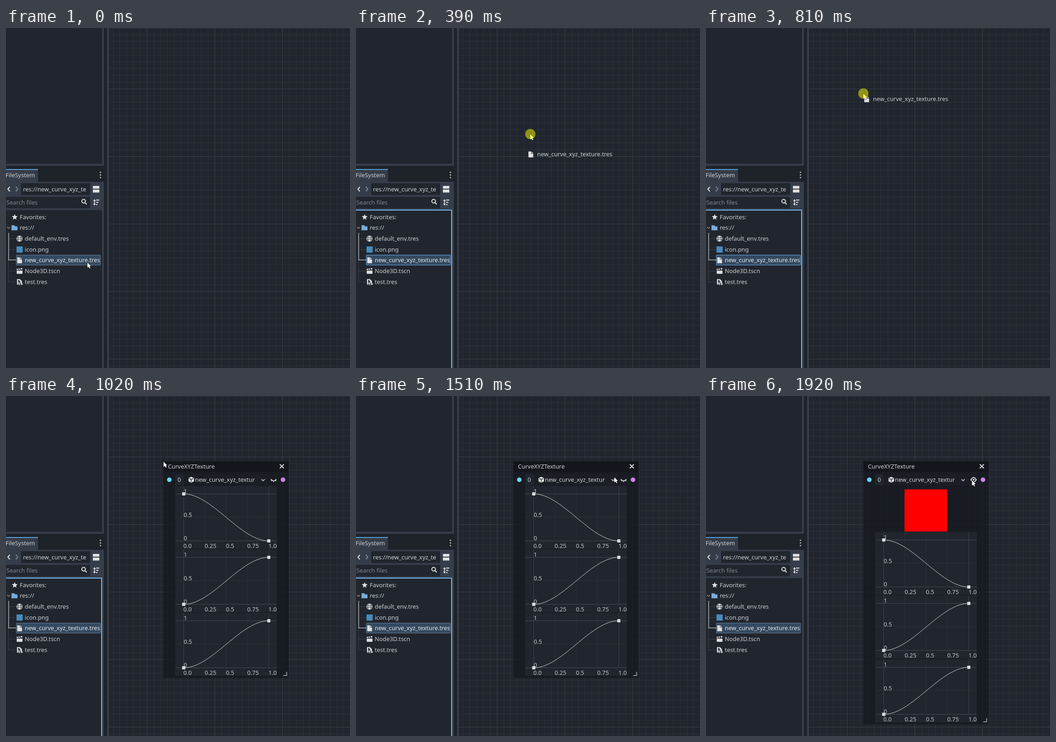
These frames come from a looping animation (752x745 px, 2610 ms). An HTML page with a canvas:

```html
<!DOCTYPE html>
<html lang="en">
<head>
<meta charset="utf-8">
<title>Drag a curve texture into the graph</title>
<style>
html, body { margin: 0; width: 100%; height: 100%; overflow: hidden; background: #21262e; }
canvas { display: block; }
</style>
</head>
<body>
<canvas id="stage" width="752" height="745"></canvas>
<script>
const ctx = document.getElementById("stage").getContext("2d");
const LOOP = 2610;
const PRESS = 250, DRAG = 320, DROP = 950, EYE_PRESS = 1790, PREVIEW = 1920;
const BASE = "#363d4a", PANEL = "#21262e", GAP = "#1e2229";
const TEXT = "#cdcfd2", ICON = "#e0e0e0", BLUE = "#70bafa";
const FILE = "new_curve_xyz_texture.tres";

// Keys are [time, x, y].
const pointerPath = [
  [0, 178, 514], [70, 178, 513.5], [250, 184, 507], [320, 300, 352], [390, 381, 233],
  [460, 383, 172], [530, 381, 147], [600, 374, 140], [670, 357, 139.5], [740, 345.5, 143.5],
  [810, 344, 144], [1020, 344.5, 144], [1090, 352, 146], [1160, 385, 156], [1230, 436, 168],
  [1300, 489, 174], [1370, 530, 175], [1440, 556, 174], [1510, 564.5, 178],
  [1580, 573, 181], [1650, 579, 184], [1720, 582, 186], [1920, 581.5, 185]
];
const dragPath = [
  [320, 250, 470], [390, 382, 277], [460, 394, 215], [530, 394, 168],
  [600, 386, 152.5], [670, 370, 151], [740, 353, 155], [810, 351, 156]
];

function along(path, t) {
  const i = path.findIndex(key => key[0] > t);
  if (i < 0) return path[path.length - 1].slice(1);
  if (i === 0) return path[0].slice(1);
  const [a, b] = [path[i - 1], path[i]];
  const k = (t - a[0]) / (b[0] - a[0]);
  return [a[1] + (b[1] - a[1]) * k, a[2] + (b[2] - a[2]) * k];
}

function tick(t) {
  const from = start => start + 70 * Math.floor((t - start) / 70);
  if (t < 70) return 0;
  if (t < 250) return 70;
  if (t < 810) return from(250);
  if (t < 950) return 810;
  return t < 1920 ? from(950) : 1920;
}

function rect(x, y, w, h, color) {
  ctx.fillStyle = color;
  ctx.fillRect(x, y, w, h);
}

function round(x, y, w, h, r, color) {
  ctx.fillStyle = color;
  ctx.beginPath();
  ctx.roundRect(x, y, w, h, r);
  ctx.fill();
}

function disc(x, y, r, color) {
  ctx.fillStyle = color;
  ctx.beginPath();
  ctx.arc(x, y, r, 0, Math.PI * 2);
  ctx.fill();
}

function text(str, x, y, color = TEXT, size = 12.85) {
  ctx.font = `${size}px "Noto Sans", sans-serif`;
  ctx.fillStyle = color;
  ctx.fillText(str, x, y);
}

// Path data is relative to (x, y).
function shape(d, x, y, { fill, stroke, width = 1.6 }) {
  const path = new Path2D(d);
  ctx.save();
  ctx.translate(x, y);
  if (fill) {
    ctx.fillStyle = fill;
    ctx.fill(path);
  }
  if (stroke) {
    ctx.strokeStyle = stroke;
    ctx.lineWidth = width;
    ctx.stroke(path);
  }
  ctx.restore();
}

function fileIcon(x, y) {
  shape("M-5 -6.5H1V-1.5H5.5V6.5H-5Z M2 -6.5L5.5 -2.5H2Z", x, y, { fill: ICON });
}

function starIcon(x, y) {
  let d = "";
  for (let i = 0; i < 10; i++) {
    const a = i * Math.PI / 5, r = i % 2 ? 3 : 6.8;
    d += `${i ? "L" : "M"}${Math.sin(a) * r} ${-Math.cos(a) * r}`;
  }
  shape(d + "Z", x, y + 0.5, { fill: ICON });
}

function globeIcon(x, y) {
  shape("M-5.8 0A5.8 5.8 0 1 0 5.8 0A5.8 5.8 0 1 0 -5.8 0H5.8M0 -6V6M0 -6Q-5 0 0 6Q5 0 0 -6",
    x, y, { stroke: ICON, width: 1.3 });
}

function sceneIcon(x, y) {
  rect(x - 6, y - 1, 12.5, 7, ICON);
  shape("M-6 -2V-5L-4 -5.3L-2.5 -2.5Z M-2.5 -5.5L0 -5.8L1.5 -3L-1 -2.7Z M2 -6L6 -6.5V-3.5L3.5 -3.2Z",
    x, y, { fill: ICON });
}

function shaderIcon(x, y) {
  shape("M-5.5 6V-6H1L5 -2V1H2V-1H0V-4H-3V6Z", x, y, { fill: ICON });
  shape("M-2 1L-0.5 6L1 1M6 1.5H3V3.5H6V6H2.5", x, y, { stroke: ICON, width: 1.4 });
}

function drawGraph() {
  rect(225, 0, 527, 745, PANEL);
  for (const major of [false, true]) {
    const color = major ? "#3b4047" : "#2c3138";
    for (let i = -9; i < 50; i++) {
      if ((i % 10 === 0) !== major) continue;
      const x = Math.floor(308.2 + i * 14.82), y = Math.floor(133.3 + i * 14.81);
      if (x > 225) rect(x, 0, 1, 745, color);
      rect(225, y, 527, 1, color);
    }
  }
}

function drawDock(focused, selectedFocus) {
  rect(0, 0, 225, 745, GAP);
  rect(0, 0, 214, 302, BASE);
  rect(0, 0, 210, 297.5, PANEL);
  rect(221, 0, 4, 745, BASE);

  rect(0, 309, 70, 28, BASE);
  rect(0, 309, 70, 2, "#5a9ed6");
  text("FileSystem", -1, 326.5);
  for (let i = -1; i <= 1; i++) disc(206.5, 322 + i * 5.7, 1.7, "#a0a3a8");
  rect(0, 337, 214, 408, BASE);

  shape("M2.5 -5L-2 0L2.5 5", 6, 353, { stroke: ICON, width: 2 });
  shape("M-2.5 -5L2 0L-2.5 5", 24, 353, { stroke: "#7d828a", width: 2 });
  round(33, 340, 151, 26, 3, PANEL);
  text("res://new_curve_xyz_te", 37.3, 357.5);
  rect(190, 346, 14, 6, ICON);
  rect(190, 354, 14, 6.5, ICON);

  round(-4, 370, 188, 25, 3, PANEL);
  text("Search files", 0.7, 386.5, "#84888f");
  shape("M3.2 -1.5A4 4 0 1 1 -4.8 -1.5A4 4 0 1 1 3.2 -1.5M2 1.5L6 5.5", 170.5, 381,
    { stroke: ICON, width: 2 });
  shape("M-3.5 -4V4M0 -5H7M0 0H5M0 5H3", 197, 382, { stroke: ICON, width: 1.8 });
  shape("M-6.5 -3L-3.5 -7L-0.5 -3Z M-6.5 3L-3.5 7L-0.5 3Z", 197, 382, { fill: ICON });

  rect(0, 399, 210, 346, PANEL);
  if (focused) {
    rect(0, 398, 210, 2, BLUE);
    rect(208, 398, 2, 347, BLUE);
  }
  drawTree(selectedFocus);
}

function drawTree(selectedFocus) {
  const row = i => 414 + i * 23.72;
  const guide = "#3b4048", active = "#aeb1b5";
  for (const i of [2, 3, 5, 6]) rect(6, Math.floor(row(i)), 16, 1, guide);
  rect(5, 509, 1, 48, guide);
  rect(5, 449, 1.5, 60, active);
  rect(5, 507.5, 17, 1.5, active);

  round(22, 497, 185, 23, 2, selectedFocus ? "#69aee8" : "#647d94");
  round(23, 498, 183, 21, 1, "#344a60");

  starIcon(19, row(0));
  shape("M-3 -1.5L0 1.5L3 -1.5", 5.5, row(1), { stroke: "#8e9298", width: 1.6 });
  shape("M-6.5 -5.5H0L1.5 -3H6.5V5.5H-6.5Z", 18.5, row(1), { fill: "#78acd8" });
  globeIcon(29.5, row(2));
  rect(23, row(3) - 6.5, 13.5, 13.5, "#478cbf");
  fileIcon(29.5, row(4));
  sceneIcon(29.5, row(5));
  shaderIcon(29.5, row(6));

  const names = ["Favorites:", "res://", "default_env.tres", "icon.png", FILE, "Node3D.tscn", "test.tres"];
  names.forEach((name, i) =>
    text(name, i < 2 ? 30 : 41, row(i) + 4.5, i === 4 ? "#e6e8ea" : TEXT));
}

function drawCurve(y, falling) {
  const left = 388, step = 46.5, height = 103;
  rect(370, y - 17, 222, 138, PANEL);
  for (let i = 0; i < 5; i++)
    rect(Math.floor(left + i * step), y - 17, 1, height + 17, i % 4 ? "#2b3037" : "#3e4249");
  for (let i = 0; i < 3; i++)
    rect(370, Math.floor(y + i * height / 2), 222, 1, i % 2 ? "#2b3037" : "#454950");

  ["1", "0.5", "0"].forEach((label, i) => text(label, 388.5, y - 0.7 + i * height / 2, "#c4c6c9"));
  ["0.0", "0.25", "0.5", "0.75", "1.0"].forEach((label, i) =>
    text(label, 387.8 + i * step, y + 118.5, "#c4c6c9"));

  const valueY = u => {
    const s = u * u * (3 - 2 * u);
    return y + height * (falling ? s : 1 - s);
  };
  ctx.beginPath();
  for (let i = 0; i <= 93; i++) ctx.lineTo(left + 0.5 + i * 2, valueY(i / 93) + 0.5);
  ctx.strokeStyle = "#e6e6e6";
  ctx.lineWidth = 1;
  ctx.stroke();
  for (const u of [0, 1])
    rect(left - 3 + u * 186, Math.round(valueY(u)) - 3, 7, 7, "#d8d9da");
}

function drawNode(open) {
  const shift = open ? 101.5 : 0;
  round(344, 143, 274, 475 + shift, 3, "rgba(22, 25, 31, 0.76)");
  round(344, 143, 274, 23, [3, 3, 0, 0], "rgba(18, 20, 25, 0.8)");
  text("CurveXYZTexture", 354, 158.5);
  shape("M-4.5 -4.5L4.5 4.5M4.5 -4.5L-4.5 4.5", 603, 154, { stroke: ICON, width: 1.9 });

  disc(357, 183.5, 5, "#6fd8f2");
  disc(605.5, 183.5, 5, "#d280ee");
  round(370, 171, 18.5, 24.5, 2, PANEL);
  text("0", 375, 188);
  round(391, 171, 181, 24.5, 2, "#1b1f25");
  shape("M0 -6.5L6 -3.5V3.5L0 6.5L-6 3.5V-3.5Z", 405, 183.5, { fill: ICON });
  shape("M-4.5 -2.8L0 -0.5L4.5 -2.8M0 -0.5V5", 405, 183.5, { stroke: "#1b1f25", width: 1.4 });
  text("new_curve_xyz_textur", 413, 188);
  shape("M-3.5 -1.7L0 1.7L3.5 -1.7", 562, 184, { stroke: "#bfc1c4", width: 1.7 });

  if (open) {
    shape("M-7 0Q0 -12 7 0Q0 12 -7 0Z", 585, 183.5, { fill: ICON });
    disc(585, 183.5, 3.8, "#191c22");
    disc(585, 183.5, 1.9, ICON);
    rect(434, 204.5, 93, 92.5, "#ff0000");
  } else {
    shape("M-6 -1.5Q0 6.5 6 -1.5M-4 1L-5.5 3M4 1L5.5 3M0 2.5V5", 585, 183.5,
      { stroke: ICON, width: 1.7 });
  }
  for (let i = 0; i < 3; i++) drawCurve(Math.floor(214 + shift + i * 139.3), i === 0);
  shape("M-4 3H3.5V-5", 610, 609.5 + shift, { stroke: "#b4b6b9", width: 1.6 });
}

function drawPointer(x, y, pressed) {
  shape("M0 0V11.5L2.7 9L4.6 13L6.5 12.2L4.7 8.3L8 8Z", x, y,
    { stroke: "rgba(0, 0, 0, 0.65)", fill: null, width: 1.4 });
  shape("M0 0V11.5L2.7 9L4.6 13L6.5 12.2L4.7 8.3L8 8Z", x, y, { fill: "#fff" });
  if (pressed) disc(x, y - 0.5, 11.2, "rgba(255, 255, 0, 0.5)");
}

function draw(t) {
  const dragging = t >= DRAG && t < DROP;
  const pressed = (t >= PRESS && t < DROP) || (t >= EYE_PRESS && t < PREVIEW);
  drawGraph();
  drawDock(t >= PRESS && t < EYE_PRESS, t >= PRESS && t < DROP);
  if (t >= DROP) drawNode(t >= PREVIEW);
  if (dragging) {
    const [x, y] = along(dragPath, t);
    fileIcon(x, y);
    text(FILE, x + 14, y + 4.3);
  }
  drawPointer(...along(pointerPath, t), pressed);
}

function frame() {
  draw(tick(performance.now() % LOOP));
  requestAnimationFrame(frame);
}
frame();
</script>
</body>
</html>
```
